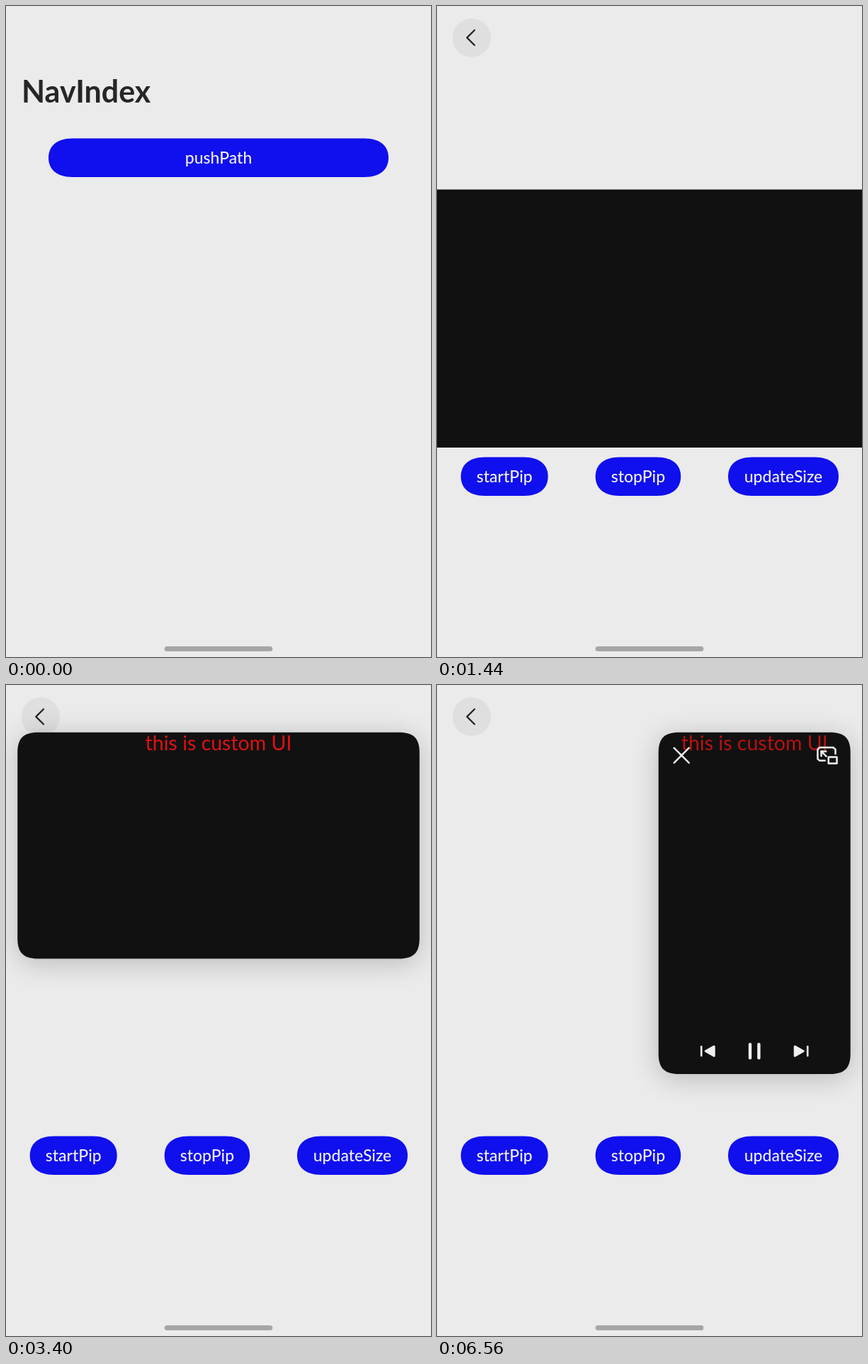
Animation, 600 px wide and 917 px high, one loop 8000 ms. Source, as an HTML page with a canvas:

```html
<!DOCTYPE html>
<html lang="en">
<head>
<meta charset="utf-8">
<title>Navigation and floating window</title>
<style>
  html, body { margin: 0; width: 100%; height: 100%; overflow: hidden; background: #ebebeb; }
  canvas { display: block; }
</style>
</head>
<body>
<canvas id="stage" width="600" height="917"></canvas>
<script>
const W = 600, H = 917, LOOP = 8000, STEP = 130;
const BG = '#ebebeb', BLUE = '#100fee', BLACK = '#111111';
const FONT = 'Lato, "Open Sans", sans-serif';
const ctx = document.getElementById('stage').getContext('2d');

const lerp = (a, b, p) => a + (b - a) * p;

function stepped(t, start, count) {
  const k = Math.floor((t - start) / STEP);
  return Math.min(k, count - 1) * STEP;
}

// Critically damped spring, 0 to 1.
function spring(ms) {
  if (ms <= 0) return 0;
  const u = ms * 0.0185;
  return 1 - (1 + u) * Math.exp(-u);
}

// Rounded rectangle whose corners blend softly into the sides.
function softRect(x, y, w, h, r) {
  const ex = Math.min(1.25 * r, w / 2), ey = Math.min(1.25 * r, h / 2);
  const cx = (2.344 * r - ex) / 3, cy = (2.344 * r - ey) / 3;
  const x2 = x + w, y2 = y + h;
  ctx.beginPath();
  ctx.moveTo(x + ex, y);
  ctx.lineTo(x2 - ex, y);
  ctx.bezierCurveTo(x2 - cx, y, x2, y + cy, x2, y + ey);
  ctx.lineTo(x2, y2 - ey);
  ctx.bezierCurveTo(x2, y2 - cy, x2 - cx, y2, x2 - ex, y2);
  ctx.lineTo(x + ex, y2);
  ctx.bezierCurveTo(x + cx, y2, x, y2 - cy, x, y2 - ey);
  ctx.lineTo(x, y + ey);
  ctx.bezierCurveTo(x, y + cy, x + cx, y, x + ex, y);
  ctx.closePath();
}

function text(str, x, y, font, color, align = 'center') {
  ctx.font = `${font} ${FONT}`;
  ctx.textAlign = align;
  ctx.fillStyle = color;
  ctx.fillText(str, x, y);
}

function line(...pts) {
  ctx.beginPath();
  for (let i = 0; i < pts.length; i += 2) ctx.lineTo(pts[i], pts[i + 1]);
  ctx.stroke();
}

function button(label, x, y, w) {
  softRect(x, y, w, 54.5, 27.25);
  ctx.fillStyle = BLUE;
  ctx.fill();
  text(label, x + w / 2, y + 35.3, '500 23px', '#f0f0f5');
}

function fillPage(color) {
  ctx.fillStyle = color;
  ctx.fillRect(0, 0, W, H);
}

function drawHome(p) {
  ctx.save();
  ctx.translate(-108 * p, 0);
  text('NavIndex', 22, 136, 'bold 43px', '#262626', 'left');
  button('pushPath', 60, 186.5, 480);
  ctx.restore();
  fillPage(`rgba(0,0,0,${0.1 * p})`);
}

function drawBack(alpha) {
  ctx.globalAlpha = alpha;
  ctx.fillStyle = '#dfdfdf';
  ctx.beginPath();
  ctx.arc(49, 44.7, 27.2, 0, Math.PI * 2);
  ctx.fill();
  ctx.strokeStyle = '#222222';
  ctx.lineWidth = 2.2;
  line(53, 34, 42.3, 44.6, 53, 55.2);
  ctx.globalAlpha = 1;
}

function drawDetail(p, showVideo) {
  const rest = 1 - p;
  ctx.save();
  ctx.beginPath();
  ctx.rect(W * rest, 0, W, H);
  ctx.clip();
  fillPage(BG);
  ctx.translate(W / 2 * rest, 0);
  drawBack(Math.max(0, 1 - rest * 4.5));
  if (showVideo) {
    ctx.fillStyle = BLACK;
    ctx.fillRect(0, 258.5, W, 363.5);
  }
  button('startPip', 33.7, 635.6, 123);
  button('stopPip', 223.7, 635.6, 120.5);
  button('updateSize', 411, 635.6, 156);
  ctx.restore();
}

function skipIcon(x, y, dir) {
  ctx.save();
  ctx.translate(x, y);
  ctx.scale(dir, 1);
  ctx.lineWidth = 2.6;
  line(75, -6.5, 75, 6.5);
  ctx.lineWidth = 3;
  ctx.beginPath();
  ctx.moveTo(57, -6.6);
  ctx.lineTo(69, 0);
  ctx.lineTo(57, 6.6);
  ctx.closePath();
  ctx.fill();
  ctx.stroke();
  ctx.restore();
}

function drawControls(x, y, w, h, alpha) {
  const mid = x + w / 2, bottom = y + h - 32.3;
  ctx.save();
  ctx.globalAlpha = alpha;
  ctx.strokeStyle = ctx.fillStyle = '#f0f0f0';

  ctx.lineWidth = 2.5;
  const cx = x + 32.5, cy = y + 32.3;
  line(cx - 10.5, cy - 10.5, cx + 10.5, cy + 10.5);
  line(cx - 10.5, cy + 10.5, cx + 10.5, cy - 10.5);

  ctx.save();
  ctx.translate(x + w - 33, cy);
  line(-3, 7.5, -10.5, 7.5, -13.3, 5, -13.3, -8.3, -10.5, -11, 9, -11, 11.8, -8.3, 11.8, -2);
  line(-8.2, 1, -8.2, -5.7, -1.5, -5.7);
  line(-8.2, -5.7, -1.2, 1.2);
  ctx.strokeRect(2, 2.5, 11.8, 8.8);
  ctx.restore();

  skipIcon(mid, bottom, -1);
  skipIcon(mid, bottom, 1);
  ctx.lineWidth = 4.4;
  for (const dx of [-6.2, 6.2]) line(mid + dx, bottom - 9.5, mid + dx, bottom + 9.5);
  ctx.restore();
}

function drawPip(t) {
  const p = spring(stepped(t, 2360, 7) - 228);
  const tall = t < 6040 ? 0 : t >= 6560 ? 1 : spring(stepped(t, 6040, 5) + 20);
  const scale = lerp(600 / 567.5, 1, p);
  const w = lerp(567.5 * scale, 271, tall);
  const h = lerp(318.7 * scale, 481.3, tall);
  const x = lerp(300 - w / 2, 583.7 - w, tall);
  const y = lerp(440.3 - 337 / 2, 66.7, p);

  ctx.save();
  ctx.shadowColor = `rgba(0,0,0,${0.04 + 0.17 * p})`;
  ctx.shadowBlur = 38;
  ctx.shadowOffsetY = 6 * p;
  softRect(x, y, w, h, lerp(4, 23, p));
  ctx.fillStyle = BLACK;
  ctx.fill();
  ctx.restore();

  let controls = 0;
  if (t >= 5120) controls = t >= 5510 ? 1 : 1 - 0.22 * 0.4 ** (stepped(t, 5120, 4) / STEP);
  const red = t < 3270 ? 238 : 224 - 38 * controls;
  text('this is custom UI', x + w / 2, y + 25.7 * scale, `${28.5 * scale}px`, `rgb(${red},17,17)`);
  if (controls) drawControls(x, y, w, h, controls);
}

function draw(t) {
  fillPage(BG);
  const push = t < 790 ? 0 : t >= 1440 ? 1 : spring(stepped(t, 790, 6) + 13);
  if (push < 1) drawHome(push);
  if (push > 0) drawDetail(push, t < 2620);
  if (t >= 2360) drawPip(t);
  ctx.fillStyle = '#a6a6a6';
  ctx.beginPath();
  ctx.roundRect(223.7, 902, 152.6, 7, 3.5);
  ctx.fill();
}

ctx.lineCap = ctx.lineJoin = 'round';
const origin = performance.now();
function tick() {
  draw((performance.now() - origin) % LOOP);
  requestAnimationFrame(tick);
}
tick();
</script>
</body>
</html>
```
